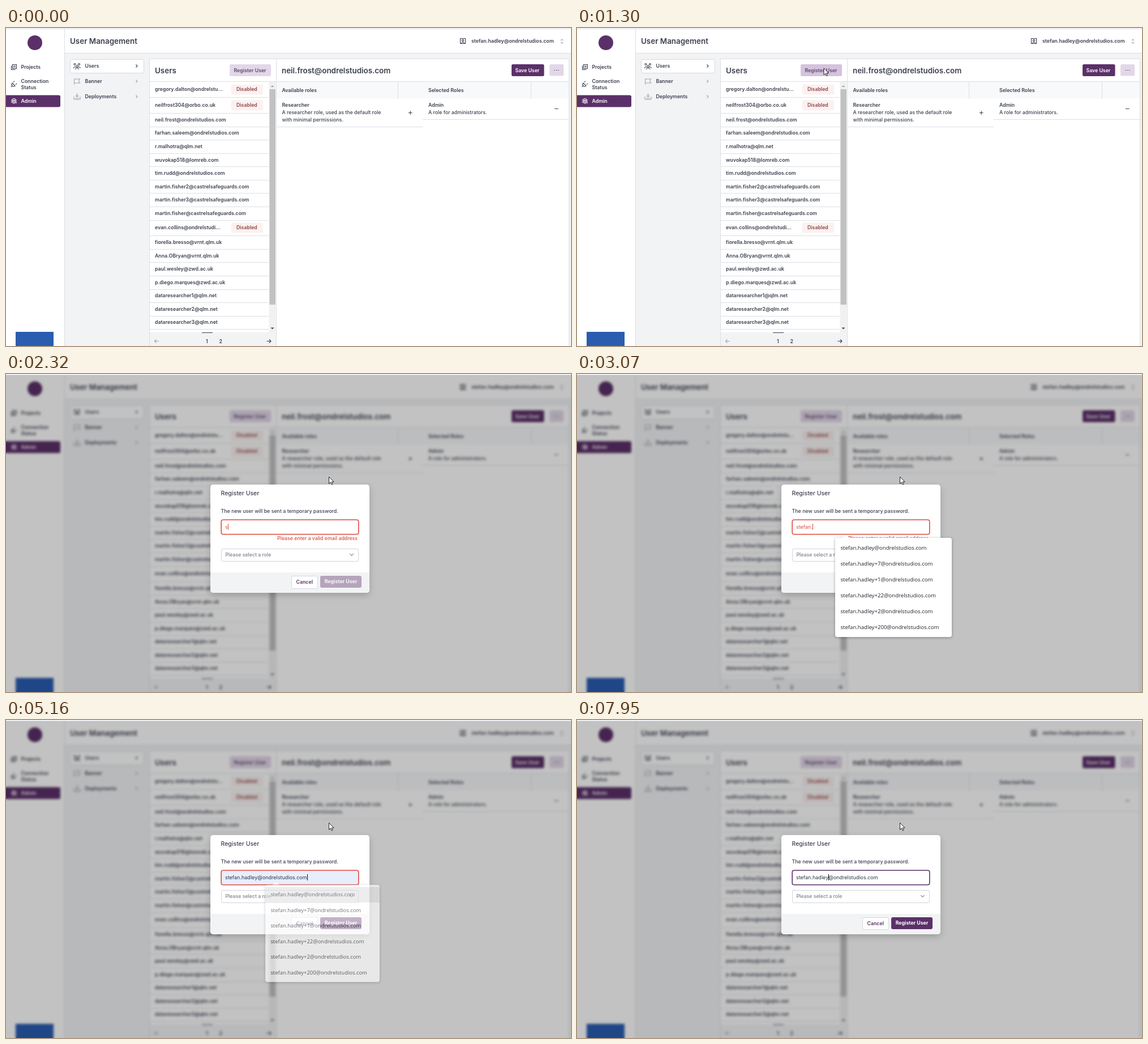
Recreate the animation shown at these times as an HTML page. Size 998x561 px, loop 8000 ms.

```html
<!DOCTYPE html>
<html lang="en">
<head>
<meta charset="utf-8">
<title>User Management</title>
<style>
html, body { margin: 0; width: 100%; height: 100%; overflow: hidden; background: #fff; }
body, svg text { font: 600 8.75px Inter, sans-serif; }
body > *, #modal > *, .row { position: absolute; box-sizing: border-box; white-space: nowrap; }
#page { left: 0; top: 0; fill: #3c404f; }
#page .big { font-size: 13.4px; }
#page .thin { font-weight: 500; }
#page .white { fill: #fff; }
#page .bg { fill: #f2f3f5; }
#page .soft { fill: #e2d7e8; }
#page .main { fill: #5b3069; }
#page .line { fill: none; stroke: #dcdfe5; }
#page .icon { fill: none; stroke: #3c404f; stroke-width: 1.1; }
#page .pale { stroke: #a2a6ae; }
#page .badge { fill: #fbf1f1; }
#page .badge + text { fill: #914747; }
#overlay { left: 0; right: 0; top: 2px; bottom: 0; background: rgba(0,0,0,.24); backdrop-filter: blur(2px); }
#modal { left: 361px; width: 281px; background: #fff; border-radius: 5px; box-shadow: 0 4px 12px #0003; color: #3c404f; line-height: 14px; overflow: hidden; }
#title { left: 18.5px; top: 9px; font-size: 10.5px; font-weight: 500; }
#hint { left: 18.5px; top: 40.5px; font-size: 8.85px; font-weight: 500; }
#field { left: 18.6px; top: 62.6px; width: 243.8px; height: 25.8px; padding-left: 6.4px; border: 1px solid var(--edge); box-shadow: 0 0 0 .6px var(--edge); border-radius: 3.5px; font-weight: 400; font-size: 9px; line-height: 23.8px; }
#caret { display: inline-block; width: 1px; height: 11px; margin-right: -1px; background: #111; vertical-align: -2px; }
#error { right: 21px; top: 88.5px; color: #dc4c3e; font-weight: 500; }
#role { left: 18.5px; width: 243.5px; height: 23px; padding-left: 7px; border: 1px solid #cfd4dc; border-radius: 3px; line-height: 20px; color: #7c808a; font-weight: 500; }
#role::after { content: ""; position: absolute; right: 9px; top: 6px; width: 4px; height: 4px; border: solid #7c808a; border-width: 0 1px 1px 0; transform: rotate(45deg); }
#foot { left: 0; right: 0; bottom: 0; height: 36px; background: #f2f3f5; }
#cancel, #submit { text-align: center; border-radius: 3px; line-height: 21px; }
#cancel { left: 143px; bottom: 7.5px; width: 46.5px; height: 22.5px; border: 1px solid #d5d9e0; background: #fff; color: #5b3069; }
#submit { left: 194px; bottom: 9px; width: 73px; height: 21px; background: #5b3069; color: #fff; font-weight: 700; }
#list { left: 456px; top: 289px; width: 206px; height: 175px; background: #fff; border-radius: 4px; box-shadow: 0 1px 5px #0005; font: 400 9.6px "Open Sans", sans-serif; color: #20242e; }
#list::before { content: ""; position: absolute; left: 13px; top: -5px; border: solid transparent; border-width: 0 6px 5px; border-bottom-color: #fff; }
.row { left: 0; width: 100%; height: 28px; padding-left: 9.5px; line-height: 28px; }
#cursor { left: 0; top: 0; overflow: visible; }
</style>
</head>
<body>
<svg id="page" width="998" height="561">
  <path class="line" d="M0 1.5H998"/>
  <path class="bg" d="M104 45H998V561H104z"/>
  <path class="white" d="M253 54H478V537H253zM478 54H994.5V561H478z"/>
  <path class="line" d="M103.5 2V561M104 44.5H998M253.5 54V561M477.5 54V561M994.5 54V561M253 54.5H994"/>

  <circle class="main" cx="51" cy="26" r="13"/>
  <rect x="17" y="536" width="67" height="67" fill="#2a5db0"/>
  <path class="main" d="M0 118.500H93q3 0 3 3v15q0 3-3 3H0z"/>
  <text x="26.5" y="72">Projects</text>
  <text x="26.5" y="97">Connection</text>
  <text x="26.5" y="108">Status</text>
  <text x="26.5" y="132" class="white">Admin</text>
  <path class="icon" d="M11.5 64.5h7v7h-7zM9.5 66.5v7h7M13 67h4M13 69h4"/>
  <path class="icon" d="M9 104l2.5-2.5M11 97l5 5q-3 2.5-5 0t0-5zM13 96l2-2.5M17 100l2-2.5"/>
  <path class="icon" style="stroke:#fff" d="M9.5 128q4.5-7 9 0M10 132v-2q4-6 8 0v3M12 133v-3q2-3 4 0v3M14 130v4"/>

  <text x="113" y="28" class="big">User Management</text>
  <path class="icon" d="M802.5 18.5h9v9h-9zM804 27q3-4 6 0"/>
  <circle class="icon" cx="807" cy="22" r="1.6"/>
  <text x="822" y="26">stefan.hadley@ondrelstudios.com</text>
  <path class="icon pale" d="M980 22l2-2 2 2M980 25l2 2 2-2"/>

  <rect x="113.5" y="55.5" width="130" height="24" rx="3" fill="#fff" stroke="#d5d9e0"/>
  <text x="139.5" y="69.5">Users</text>
  <text x="139.5" y="97">Banner</text>
  <text x="139.5" y="124">Deployments</text>
  <path class="icon" d="M229.5 64.5l2.5 2.5-2.5 2.5M119.5 71v-1q2-3 4 0M127 70q2-3 4 0v1M122 73q3.5-5 7 0"/>
  <g class="icon"><circle cx="121.5" cy="64" r="1.5"/><circle cx="129" cy="64" r="1.5"/><circle cx="125.5" cy="67.5" r="1.7"/></g>
  <path class="icon pale" d="M229.5 91.5l2.5 2.5-2.5 2.5M229.5 118.5l2.5 2.5-2.5 2.5M120.5 100v-10h10l-2 3.5 2 3.5h-10M120 121v5h11v-5M125.5 115v6M123 119l2.5 2.5 2.5-2.5M122 124h7"/>

  <text x="263" y="79.5" class="big">Users</text>
  <rect id="register" class="soft" x="395" y="64" width="73" height="21" rx="2.5"/>
  <text x="402.5" y="77.5" fill="#5d4a6a">Register User</text>
  <path class="line" d="M253 94.5H994"/>
  <g id="users"></g>
  <path fill="#f1f1f1" d="M464.5 95h12v442h-12z"/>
  <path fill="#c1c1c1" d="M465.5 108h10.5v380h-10.5z"/>
  <path fill="#a3a3a3" d="M467.5 104l3-3 3 3z"/>
  <path fill="#444" d="M467.5 528.5l3 3 3-3z"/>
  <path class="bg" d="M254 537.5h223v24h-223z"/>
  <path d="M346 537h19v1h-19z"/>
  <text x="353" y="555.5">1</text>
  <text x="376.5" y="555.5">2</text>
  <path class="icon pale" d="M270 552.5h-7.5M265.5 549.5l-3 3 3 3"/>
  <path class="icon" d="M460.5 552.5h7.5M465 549.5l3 3-3 3"/>

  <text x="487" y="79.5" class="big">neil.frost@ondrelstudios.com</text>
  <rect class="main" x="893" y="64" width="57.5" height="21" rx="2.5"/>
  <text x="899.5" y="77.5" class="white" font-weight="700">Save User</text>
  <rect class="soft" x="960" y="64" width="25" height="20.5" rx="2.5"/>
  <path class="icon" stroke-dasharray="1.5 1.7" d="M968.5 74.5h8"/>
  <path fill="#f8f9fb" d="M478 95h516v29.5h-516z"/>
  <path class="line" d="M692.5 95v29.5M927.5 95v29.5M478 174.5h258M736 161.5h258"/>
  <text x="487.5" y="113">Available roles</text>
  <text x="746" y="113">Selected Roles</text>
  <text x="487.5" y="138.5">Researcher</text>
  <text x="487.5" y="152" class="thin">A researcher role, used as the default role</text>
  <text x="487.5" y="165" class="thin">with minimal permissions.</text>
  <text x="746" y="138.5">Admin</text>
  <text x="746" y="152" class="thin">A role for administrators.</text>
  <path class="icon" d="M711 149.5h6.5M714.2 146.2v6.5M969 142.5h6.5"/>
</svg>

<div id="overlay"></div>
<div id="modal">
  <div id="title">Register User</div>
  <div id="hint">The new user will be sent a temporary password.</div>
  <div id="field"><span id="before"></span><span id="caret"></span><span id="after"></span></div>
  <div id="error">Please enter a valid email address</div>
  <div id="role">Please select a role</div>
  <div id="foot"></div>
  <div id="cancel">Cancel</div>
  <div id="submit">Register User</div>
</div>
<div id="list"></div>
<svg id="cursor" width="10" height="16"><path d="M.5 .5v12l2.8-2.6 1.9 4.3 1.9-.8-1.9-4.2h3.9z" fill="#fff" stroke="#111" stroke-width=".9"/></svg>

<script>
const $ = id => document.getElementById(id);
const LOOP = 8000, NAME = "stefan.hadley", HOST = "@ondrelstudios.com", EMAIL = NAME + HOST;
const PURPLE = "#5b3069", RED = "#dc4c3e";

// A leading "!" marks a disabled account.
const users = `!gregory.dalton@ondrelstu... !neilfrost304@orbo.co.uk neil.frost${HOST}
  farhan.saleem${HOST} r.malhotra@qlm.net wuvokap518@lomreb.com tim.rudd${HOST}
  martin.fisher2@castrelsafeguards.com martin.fisher3@castrelsafeguards.com
  martin.fisher@castrelsafeguards.com !evan.collins@ondrelstudi...
  fiorella.bresso@vrnt.qlm.uk Anna.OBryan@vrnt.qlm.uk paul.wesley@zwd.ac.uk
  p.diego.marques@zwd.ac.uk dataresearcher1@qlm.net dataresearcher2@qlm.net
  dataresearcher3@qlm.net`.split(/\s+/);
let rowTop = 94.5;
for (const user of users) {
  const disabled = user[0] === "!", height = disabled ? 27.8 : 23.55, mid = rowTop + height / 2;
  rowTop += height;
  $("users").innerHTML += `<text x="263" y="${mid + 3}">${user.replace("!", "")}</text>
    <path class="line" d="M253 ${Math.round(rowTop) + .5}H464"/>` + (disabled ?
    `<rect class="badge" x="398" y="${mid - 9}" width="56" height="18" rx="2"/><text x="407" y="${mid + 3}">Disabled</text>` : "");
}

const options = ["", "+7", "+1", "+22", "+2", "+200"].map(tag => NAME + tag + HOST);
$("list").innerHTML = options.map((o, i) => `<div class="row" style="top:${4 + 28 * i}px">${o}</div>`).join("");

const ramp = (t, start, length) => Math.min(1, Math.max(0, (t - start) / length));
const mix = (p, a, b) => `color-mix(in srgb, ${b} ${p * 100}%, ${a})`;
const step = t => 128 + Math.floor((t - 128) / 68.8) * 68.8;

// [time, x, y]
const mousePath = [[60, 990, 610], [130, 935, 556], [300, 790, 448], [680, 541, 168], [890, 451, 89],
  [1030, 435, 70], [1297, 435, 70], [1366, 494, 110], [1500, 570, 181]];
function mouseAt(t) {
  const i = mousePath.findIndex(p => p[0] > t);
  if (i < 0) return mousePath.at(-1).slice(1);
  if (!i) return mousePath[0].slice(1);
  const [a, b] = [mousePath[i - 1], mousePath[i]], p = ramp(t, a[0], b[0] - a[0]);
  return [1, 2].map(k => a[k] + (b[k] - a[k]) * p);
}

const keyTimes = [2320, 2600, 2740, 2850, 2930, 3000, 3070];
const caretMoves = [[5160, 31], [5390, 30], [5530, 29], [6600, 15], [6730, 14], [6870, 13], [7000, 12], [7270, 13]];
function caretAt(t) {
  if (t >= 5990 && t < 6600) return Math.max(16, 28 - 2 * Math.floor((t - 5990) / 68.3));
  return caretMoves.findLast(m => m[0] <= t)[1];
}

function fieldAt(t, row) {
  if (t < 2320) return { before: "", after: "Email Address", caret: t > 1430 && t < 1790, color: "#9a9ea8" };
  if (t < 3820) return { before: EMAIL.slice(0, keyTimes.filter(k => k <= t).length), after: "", caret: t < 3620, color: RED };
  if (t < 5160) return { before: options[row], after: "", caret: false, color: "#222", font: '400 7.3px/23.8px "Open Sans", sans-serif' };
  const at = caretAt(t);
  return { before: EMAIL.slice(0, at), after: EMAIL.slice(at), caret: true, color: "#2f3442" };
}

function draw() {
  const t = performance.now() % LOOP, s = step(t);
  const open = 1 - (1 - ramp(s, 1310, 200)) ** 3;
  const invalid = t >= 2320 && t < 5160;
  const row = t < 3820 ? -1 : t >= 4630 && t < 4980 ? 1 : 0;

  $("register").style.fill = t >= 1030 && t < 1370 ? "#d5c2de" : "";
  $("overlay").style.opacity = open;
  const height = invalid ? 191.5 : 175;
  Object.assign($("modal").style, {
    opacity: open, height: height + "px", top: 290.3 - height / 2 + "px", transform: `scale(${.95 + .05 * open})`
  });

  const field = fieldAt(t, row);
  const edge = t < 2320 ? mix(ramp(s, 1370, 200), "#7d8290", PURPLE) : mix(ramp(s, 5160, 200), RED, PURPLE);
  $("before").textContent = field.before;
  $("after").textContent = field.after;
  $("caret").style.visibility = field.caret ? "" : "hidden";
  $("caret").style.background = t < 3820 && t >= 2320 ? RED : "#111";
  $("field").style.setProperty("--edge", edge);
  Object.assign($("field").style, {
    color: field.color,
    font: field.font || "",
    background: t < 3820 ? "#fff" : mix(ramp(s, 7580, 300), "#e8eefe", "#fff")
  });
  $("error").style.visibility = invalid ? "" : "hidden";
  $("role").style.top = (invalid ? 113.5 : 97) + "px";
  $("submit").style.opacity = invalid ? .4 : 1;

  const shown = ramp(s, 2300, 200) * (1 - ramp(s, 5110, 110));
  $("list").style.opacity = shown;
  $("list").style.transform = `scale(${.945 + .055 * shown})`;
  [...$("list").children].forEach((el, i) => el.style.background = i === row ? "#e3e3e5" : "");

  const [x, y] = mouseAt(s);
  $("cursor").style.transform = `translate(${x}px, ${y}px)`;
  requestAnimationFrame(draw);
}
draw();
</script>
</body>
</html>
```
